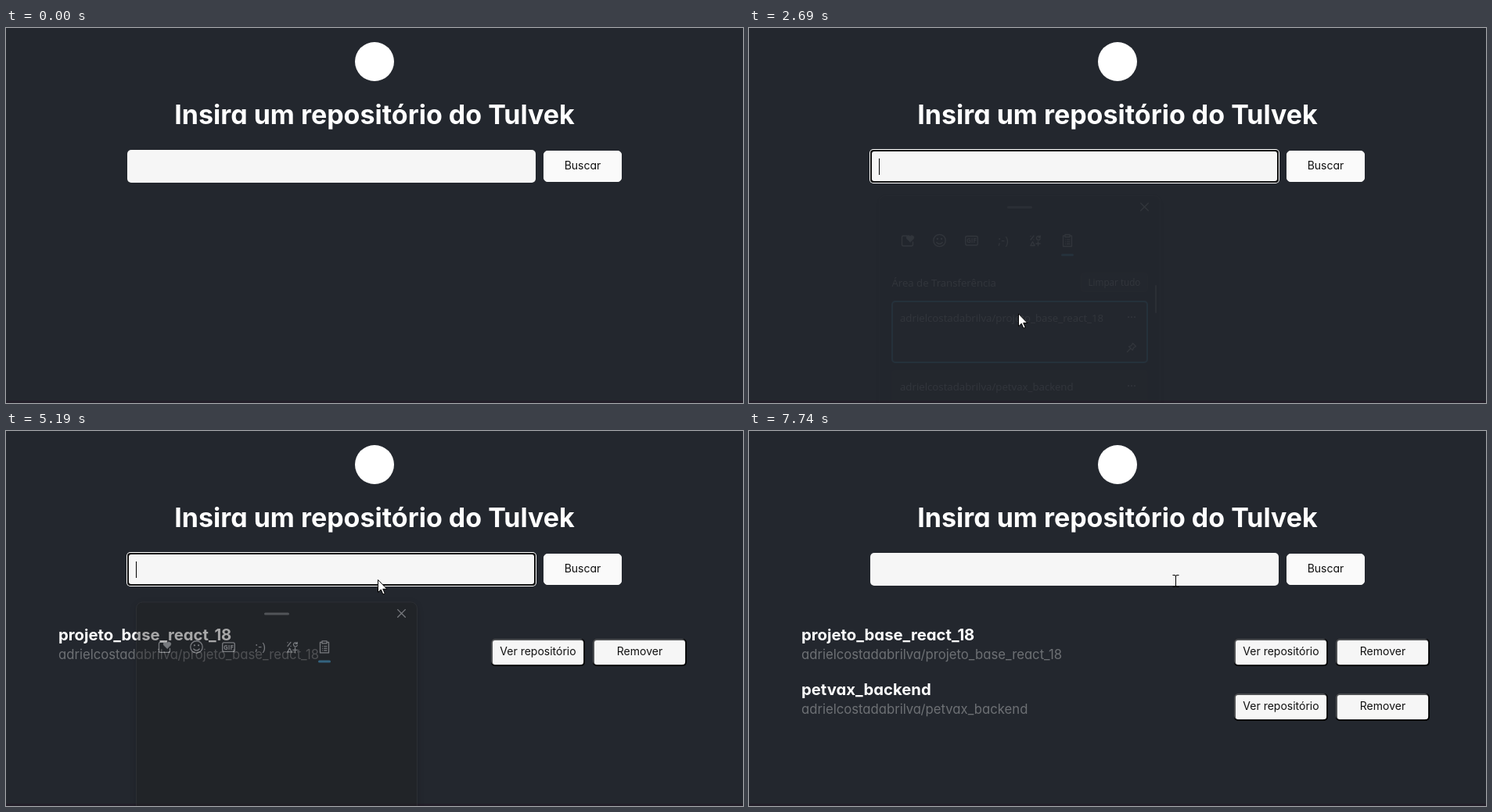
Write an HTML page that moves like this. It is 942x480 px and loops after 8 s.

```html
<!DOCTYPE html>
<html lang="pt-BR">
<head>
<meta charset="utf-8">
<title>Insira um repositório</title>
<style>
html, body { margin: 0; width: 100%; height: 100%; overflow: hidden; background: #23272e; }
svg { display: block; width: 942px; height: 480px; }
/* cv11: single-storey a */
text { font-family: Inter, sans-serif; font-feature-settings: "cv11"; white-space: pre; }
.mid { text-anchor: middle; }
.btn { font-size: 14px; fill: #111; text-anchor: middle; }
.name { font-size: 20.3px; font-weight: 700; fill: #fff; }
.path { font-size: 16.7px; fill: #6d7074; }
#panel text { font-family: "Open Sans", "Noto Sans", sans-serif; fill: #fff; }
#panel .item { font-size: 13.25px; }
.line { fill: none; stroke: #fff; stroke-width: 1.3; stroke-linecap: round; stroke-linejoin: round; }
</style>
</head>
<body>
<svg viewBox="0 0 942 480" xmlns="http://www.w3.org/2000/svg">
  <defs>
    <g id="pin" class="line">
      <path d="M1.5-5.5 5.5-1.5 2.5.2 1.2 3.4-3.4-1.2-.2-2.5ZM-1.4 1.4-5.5 5.5"/>
    </g>
    <g id="dots" fill="#fff">
      <circle cx="-4" r="1"/><circle r="1"/><circle cx="4" r="1"/>
    </g>
  </defs>

  <rect width="942" height="480" fill="#23272e"/>
  <rect y="477" width="942" height="3" fill="#231f29"/>
  <circle cx="471" cy="43" r="25" fill="#fff"/>
  <text class="mid" x="471" y="123" font-size="34" font-weight="700" fill="#fff">Insira um repositório do Tulvek</text>

  <rect id="field" x="155" y="156" width="522" height="42" rx="5" fill="#f6f6f6"/>
  <g id="ring">
    <rect x="154" y="155" width="524" height="44" rx="5" fill="#fff"/>
    <rect x="155" y="156" width="522" height="42" rx="4" fill="#101010"/>
    <rect x="157" y="158" width="518" height="38" rx="3" fill="#f6f6f6"/>
  </g>
  <text id="value" x="166" y="183" font-size="16.7" fill="#111"></text>
  <path id="wavy" fill="none" stroke="#e8262a" stroke-width="1"/>
  <rect id="caret" y="167" width="1" height="21" fill="#000"/>

  <rect id="search" x="687.5" y="157.5" width="99" height="39" rx="4.5" stroke="#fafafa"/>
  <text class="btn" x="737" y="181">Buscar</text>

  <g id="rows"></g>

  <g id="panel">
    <rect x="166.5" y="193.5" width="359" height="420" rx="8" fill="#202021" stroke="#3b3c3e"
          style="filter:drop-shadow(0 2px 4px #0005)"/>
    <rect x="330" y="207" width="32" height="3" rx="1.5" fill="#9b9b9b"/>
    <path class="line" d="M500.7 203.2l9.6 9.6m0-9.6l-9.6 9.6"/>
    <g class="line">
      <path d="M202 245h-4.5q-2 0-2 2v9q0 2 2 2h10q2 0 2-2v-3"/>
      <path d="M206 253l-4.3-4.3a2.6 2.6 0 0 1 4.3-3 2.6 2.6 0 0 1 4.3 3Z" fill="#fff" stroke-width=".6"/>
      <circle cx="243.5" cy="251" r="7.7"/>
      <path d="M239.8 253.5q3.7 4 7.4 0"/>
      <path d="M240.9 248.8v.1m5.2-.1v.1" stroke-width="2.2"/>
      <rect x="276.7" y="245.5" width="15.6" height="11.5" rx="2"/>
      <path d="M360 250l4-5m-4 .3v.1m4 4.5v.1M372 246.5a2.5 2.5 0 1 0 .2 2.5m0-4v2h-2M359.8 257.5l2.7-5 2.7 5ZM369.5 252.3v5.4m-2.7-2.7h5.4"/>
      <path d="M404 245h-2.5v13.5h11V245H410M404 243.5h6v3h-6Z"/>
      <path d="M404.5 250h.1m2 0h3.4m-5.5 2.7h.1m2 0h3.4m-5.5 2.7h.1m2 0h3.4" stroke-width="1.1"/>
    </g>
    <text class="mid" x="284.5" y="254.2" font-size="8" font-weight="700">GIF</text>
    <text class="mid" x="325" y="255.5" font-size="15">;-)</text>
    <rect x="399" y="268" width="16" height="3" rx="1.5" fill="#4cc2ff"/>
    <g id="list">
      <text x="182.5" y="310" font-size="13.2">Área de Transferência</text>
      <rect x="424.5" y="292.5" width="85" height="24" rx="4" fill="#2d2d2e" stroke="#3a3a3b"/>
      <text class="mid" x="467" y="309" font-size="11.7">Limpar tudo</text>
      <rect x="519" y="308" width="2" height="36" rx="1" fill="#a0a0a0"/>
      <rect id="item1" x="183" y="329" width="326" height="78" rx="4" stroke="#4cc2ff" stroke-width="2"/>
      <text id="clip1" class="item" x="193" y="355"></text>
      <use href="#dots" x="489" y="349"/><use href="#pin" x="489" y="388"/>
      <rect id="item2" x="182.5" y="417" width="327" height="80" rx="4"/>
      <text id="clip2" class="item" x="193" y="443"></text>
      <use href="#dots" x="489" y="437"/><use href="#pin" x="489" y="476"/>
    </g>
  </g>

  <g id="cursor">
    <path id="arrow" d="M.5.5V16.5l3.8-3.5 2.6 6 2.4-1-2.6-5.7h5.2Z" fill="#fff" stroke="#000"/>
    <path id="beam" d="M-3.5-7.5H-1Q.5-7.5.5-6V6Q.5 7.5-1 7.5H-3.5M4.500-7.5H2Q.5-7.5.5-6M.5 6Q.5 7.5 2 7.5H4.5" fill="none" stroke="#000"/>
    <path id="hand" d="M-1.7 1.5Q-1.7-.5 0-.5T1.7 1.5V7Q4.3 6 4.9 8 7 7 7.6 9 10 8.5 10 11V15.5Q10 18 8.3 20V22.5H-.5V20.5L-5.2 14.5Q-6.5 12.5-5.5 11.7-4.3 11-2.9 12.5L-1.7 13.8Z" fill="#fff" stroke="#000"/>
  </g>
</svg>

<script>
const LOOP = 8000;
const USER = "adrielcostadabrilva/";
const REPOS = ["projeto_base_react_18", "petvax_backend"];
const $ = id => document.getElementById(id);
const show = (id, on) => { $(id).style.display = on ? "" : "none"; };
const clamp = v => Math.max(0, Math.min(1, v));
const within = (t, a, b) => t >= a && t < b;

const FOCUS = [[1160, 3510], [5060, 6940]];
const OPEN = [[1570, 2560], [5190, 6130]];
const TYPED = [[2700, 3980], [6250, 7340]];
const HIDDEN = [[0, 260], [1370, 1570], [5080, 5190]];
const CLOSE_MS = 140;

// Pointer stops: time, x, y
const MOVES = [
  [260, 524, 436], [1030, 242, 178], [1700, 242, 178], [2360, 330, 372],
  [2620, 330, 372], [3250, 727, 183], [4319, 727, 183], [4320, 727, 182],
  [4590, 727, 182], [4960, 475, 190], [5400, 475, 190], [5730, 396, 393],
  [5930, 388, 440], [6240, 388, 440], [6860, 706, 183.5], [7150, 706, 183.5],
  [7740, 545, 192]
];

const button = (x, y, label) => `
  <rect x="${x}" y="${y}" width="120" height="35" rx="5" fill="#000"/>
  <rect x="${x}" y="${y}" width="118.5" height="33.5" rx="5" fill="#4d4f52"/>
  <rect x="${x + 2}" y="${y + 2}" width="116" height="31" rx="3" fill="#f6f6f6"/>
  <text class="btn" x="${x + 60}" y="${y + 21}">${label}</text>`;

$("rows").innerHTML = REPOS.map((repo, i) => `
  <g id="row${i}" transform="translate(0 ${i * 70})">
    <text class="name" x="67" y="268">${repo}</text>
    <text class="path" x="67" y="292">${USER + repo}</text>
    ${button(620, 266, "Ver repositório")}${button(750, 266, "Remover")}
  </g>`).join("");
REPOS.forEach((repo, i) => { $("clip" + (i + 1)).textContent = USER + repo; });

function zigzag(x0, x1) {
  let d = `M${x0} 187`;
  for (let x = x0 + 2, up = true; x <= x1; x += 2, up = !up) d += `L${x} ${up ? 185 : 187}`;
  return d;
}

let typed = "", endX = 166;
function setValue(str) {
  if (str === typed) return;
  typed = str;
  const el = $("value");
  el.textContent = str;
  endX = 166;
  if (!str) return;
  endX += el.getComputedTextLength();
  const cut = USER.length;
  const owner = 166 + el.getSubStringLength(0, cut - 1);
  const repo = 166 + el.getSubStringLength(0, cut);
  $("wavy").setAttribute("d", zigzag(166, owner) + zigzag(repo, endX));
}

function pointer(t) {
  if (t <= MOVES[0][0]) return MOVES[0].slice(1);
  for (let i = 1; i < MOVES.length; i++) {
    const [t0, x0, y0] = MOVES[i - 1], [t1, x1, y1] = MOVES[i];
    if (t < t1) {
      const k = clamp((t - t0) / (t1 - t0)), e = k * k * (3 - 2 * k);
      return [x0 + (x1 - x0) * e, y0 + (y1 - y0) * e];
    }
  }
  return MOVES[MOVES.length - 1].slice(1);
}

function drawPanel(t, y) {
  const span = OPEN.find(([a, b]) => within(t, a, b + CLOSE_MS));
  show("panel", span);
  if (!span) return false;
  const age = t - span[0], out = clamp((t - span[1]) / CLOSE_MS);
  const drop = 26 * Math.exp(-age / 47) + 24 * out * out;
  $("panel").setAttribute("transform", `translate(0 ${drop.toFixed(2)})`);
  $("panel").style.opacity = clamp(0.38 + age / 110) * (1 - out);
  $("list").style.opacity = clamp((age - 30) / 60);
  $("item1").setAttribute("fill", within(y, 329, 408) ? "#303032" : "#2b2b2c");
  $("item2").setAttribute("fill", y >= 417 ? "#323234" : "#2b2b2c");
  return t < span[1];
}

function draw(t) {
  const [x, y] = pointer(t);
  const open = drawPanel(t, y);
  const focus = FOCUS.find(([a, b]) => within(t, a, b));
  const word = TYPED.findIndex(([a, b]) => within(t, a, b));
  setValue(word < 0 ? "" : USER + REPOS[word]);

  show("ring", focus);
  show("field", !focus);
  show("wavy", focus && word >= 0);
  const since = word >= 0 ? TYPED[word][0] : focus ? focus[0] : 0;
  show("caret", focus && Math.floor((t - since) / 530) % 2 === 0);
  $("caret").setAttribute("x", Math.round(endX));

  const overButton = within(x, 687, 787) && within(y, 157, 197);
  const overField = within(x, 155, 677) && within(y, 156, 198);
  $("search").setAttribute("fill", overButton ? "#9d9da1" : "#fafafa");

  show("row0", t >= 3980);
  show("row1", t >= 7340);

  show("cursor", !HIDDEN.some(([a, b]) => within(t, a, b)));
  $("cursor").setAttribute("transform", `translate(${x.toFixed(1)} ${y.toFixed(1)})`);
  const shape = open ? "arrow" : overButton ? "hand" : overField ? "beam" : "arrow";
  for (const id of ["arrow", "beam", "hand"]) show(id, id === shape);
}

function tick() {
  draw(performance.now() % LOOP);
  requestAnimationFrame(tick);
}
tick();
</script>
</body>
</html>
```
